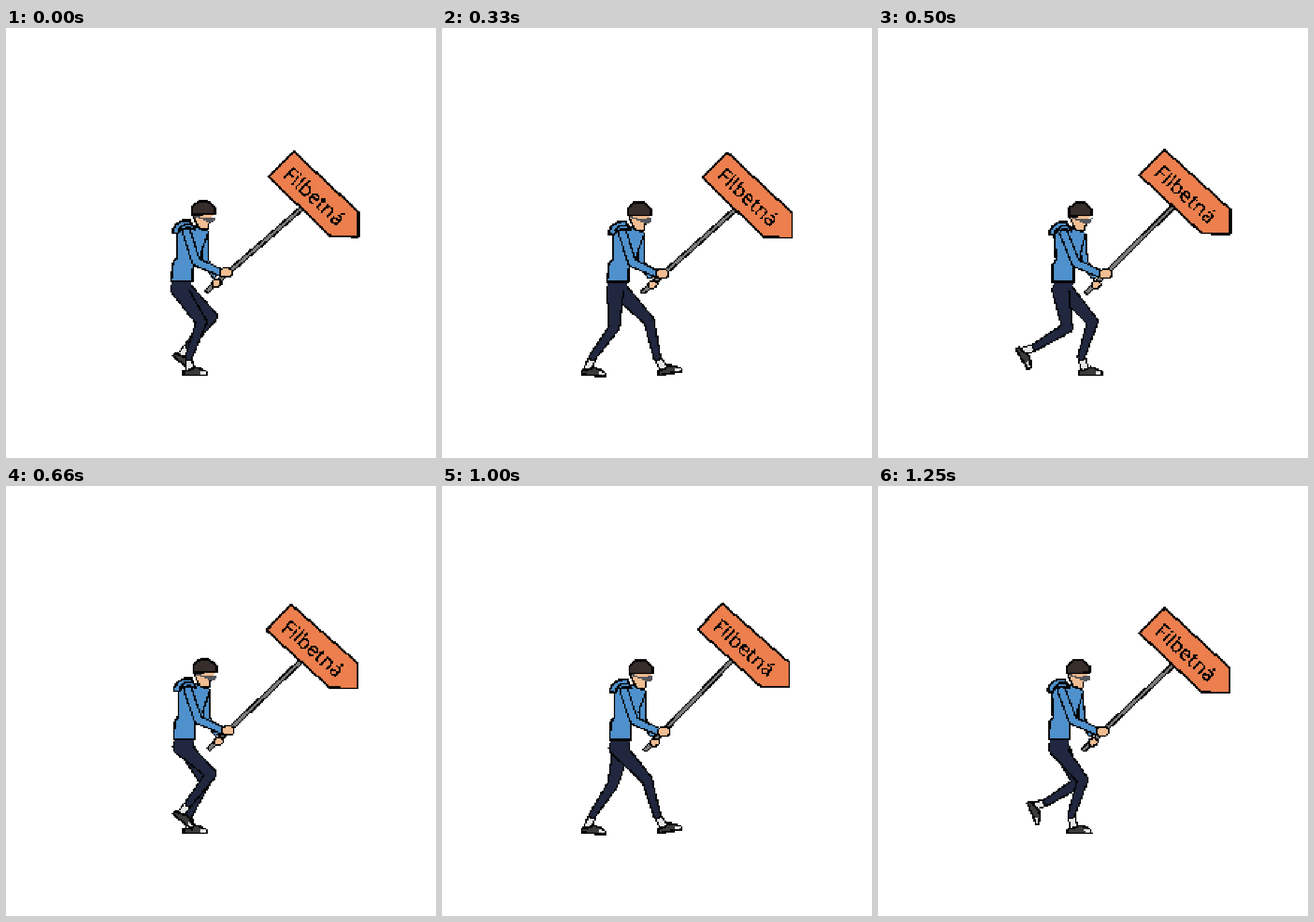
These frames come from a looping animation (748x748 px, 1390 ms). An HTML page with a canvas:

```html
<!DOCTYPE html>
<html lang="cs">
<head>
<meta charset="utf-8">
<title>Walk with a sign</title>
<style>
html, body { margin: 0; width: 100%; height: 100%; overflow: hidden; background: #fff; }
canvas { display: block; width: 100%; height: 100%; image-rendering: pixelated; }
</style>
</head>
<body>
<canvas id="view" width="288" height="288"></canvas>
<script>
const N = 288, CELL = 748 / N, STEPS = 16, LOOP = 1390, TAU = 2 * Math.PI;
const ctx = document.getElementById('view').getContext('2d');
const image = ctx.createImageData(N, N);
const cells = new Uint32Array(image.data.buffer);
const ink = document.createElement('canvas');
ink.width = ink.height = N;
const inkCtx = ink.getContext('2d', { willReadFrequently: true });

const rgb = n => (0xff000000 | (n & 255) << 16 | (n & 0xff00) | n >> 16) >>> 0;
const WHITE = rgb(0xffffff), BLACK = rgb(0x050505), ORANGE = rgb(0xec7f4d),
  BLUE = rgb(0x4f91cc), NAVY = rgb(0x20273f), SKIN = rgb(0xf1bd92),
  HAIR = rgb(0x372d2a), GREY = rgb(0x7b7c7c), LENS = rgb(0x55565c),
  SOCK = rgb(0xe6e6e6), SHOE = rgb(0x3b3b3b);

const mix = (a, b, k) => a + (b - a) * k;
const clamp = v => Math.max(0, Math.min(1, v));
const bell = (x, mid, width) => Math.exp(-(((x - mid) / width) ** 2));
// Cosine that peaks at a step and repeats a number of times per loop
const wave = (step, peak, times = 1) => Math.cos(TAU * times * (step - peak) / STEPS);

// Turns a flat list into points, each passed through a mapping
function points(list, map) {
  const out = [];
  for (let i = 0; i < list.length; i += 2) out.push(map([list[i], list[i + 1]]));
  return out;
}

function paint(pts, pad, color, inside) {
  const xs = pts.map(p => p[0]), ys = pts.map(p => p[1]);
  const cell = v => Math.max(0, Math.min(N - 1, Math.floor(v / CELL)));
  const x0 = cell(Math.min(...xs) - pad), x1 = cell(Math.max(...xs) + pad);
  const y0 = cell(Math.min(...ys) - pad), y1 = cell(Math.max(...ys) + pad);
  for (let j = y0; j <= y1; j++)
    for (let i = x0; i <= x1; i++)
      if (inside((i + .5) * CELL, (j + .5) * CELL)) cells[j * N + i] = color;
}

function fill(pts, color) {
  paint(pts, 0, color, (x, y) => {
    let hit = false;
    pts.forEach(([ax, ay], i) => {
      const [bx, by] = pts[(i + 1) % pts.length];
      if (ay > y !== by > y && x < ax + (bx - ax) * (y - ay) / (by - ay)) hit = !hit;
    });
    return hit;
  });
}

// Round-ended bar whose radius changes from r to s
function bar(p, q, r, s, color) {
  const dx = q[0] - p[0], dy = q[1] - p[1], len = dx * dx + dy * dy || 1;
  paint([p, q], Math.max(r, s), color, (x, y) => {
    const k = clamp(((x - p[0]) * dx + (y - p[1]) * dy) / len);
    return Math.hypot(x - p[0] - dx * k, y - p[1] - dy * k) <= mix(r, s, k);
  });
}

function stroke(pts, r = 1.9, color = BLACK) {
  for (let i = 1; i < pts.length; i++) bar(pts[i - 1], pts[i], r, r, color);
}

function shape(pts, color) {
  fill(pts, color);
  stroke([...pts, pts[0]]);
}

// Outlined chain of bars with one radius per joint
function limb(joints, radii, color, edge = 2.9) {
  for (const [pad, tone] of [[edge, BLACK], [0, color]])
    for (let i = 1; i < joints.length; i++)
      bar(joints[i - 1], joints[i], radii[i - 1] + pad, radii[i] + pad, tone);
}

// Knee of a leg with known lengths, bent forward
function bend(hip, ankle, thigh, shin) {
  const dx = ankle[0] - hip[0], dy = ankle[1] - hip[1], d = Math.hypot(dx, dy);
  const along = (thigh ** 2 - shin ** 2 + d * d) / (2 * d);
  const out = Math.sqrt(Math.max(0, thigh ** 2 - along ** 2));
  return [hip[0] + (dx * along + dy * out) / d, hip[1] + (dy * along - dx * out) / d];
}

// The foot slides back for half the loop, then lifts and swings forward
function drawLeg(hip, step) {
  const back = wave(step, 4);
  const lift = Math.sin(Math.PI * clamp((step - 4) / 8) ** .75) ** 2;
  const ankle = [318 - 56 * back + 4 * wave(step, 2, 2), 572 - 22 * lift];
  const pitch = (70 * bell(step, 6.7, 1.7) - 14 * bell(step, 11, 1.5)) * Math.PI / 180;
  const c = Math.cos(pitch), s = Math.sin(pitch), heel = 9 + 7 * back;
  const foot = ([along, up]) => {
    const x = along - heel, y = 32 - up;
    return [ankle[0] + x * c - y * s, ankle[1] + x * s + y * c];
  };
  limb([ankle, foot([10, 11])], [4.5, 5], SOCK);
  shape(points([0, 0, 0, 7, 10, 9, 20, 14, 31, 11, 40, 5, 41, 0], foot), SHOE);
  bar(foot([31, 5]), foot([37, 4]), 2.6, 1.8, SOCK);
  limb([hip, bend(hip, ankle, 70 - 5 * back, 64), ankle], [13, 7.5, 4.5], NAVY);
}

function drawSign(place) {
  shape(points([0, 0, 154, 0, 183, 32, 146, 64, -3, 62], place), ORANGE);
  const [ox, oy] = place([14, 45]), [ux, uy] = place([15, 45]);
  const c = (ux - ox) / CELL, s = (uy - oy) / CELL;
  inkCtx.setTransform(1, 0, 0, 1, 0, 0);
  inkCtx.clearRect(0, 0, N, N);
  inkCtx.setTransform(c, s, -s, c, ox / CELL, oy / CELL);
  inkCtx.font = '35px "Open Sans", "Noto Sans", sans-serif';
  inkCtx.fillText('Filbetná', 0, 0);
  const data = inkCtx.getImageData(0, 0, N, N).data;
  for (let i = 0; i < cells.length; i++) if (data[i * 4 + 3] > 90) cells[i] = BLACK;
}

function draw(step) {
  // The body rocks twice per loop, with a slower lean on top
  const lean = wave(step, 2);
  const sway = 2.5 + 8 * wave(step, 6, 2) + 3.2 * wave(step, 6, 4) - 3 * lean;
  const bob = 1.5 + 1.8 * wave(step, 5.3, 2);
  const shift = k => ([x, y]) => [x + k * sway, y + bob];
  const head = shift(.5), hand = shift(.8);
  const torso = p => shift(mix(.5, 1, clamp((p[1] - 345) / 95)))(p);

  const corner = [495.5 + 5 * wave(step, 2.8) + 3.5 * wave(step, 7.4, 2), 210.7 + 7.3 * wave(step, 2.4)];
  const angle = (42.3 + 1.2 * lean) * Math.PI / 180, c = Math.cos(angle), s = Math.sin(angle);
  const sign = ([u, v]) => [corner[0] + u * c - v * s, corner[1] + u * s + v * c];

  cells.fill(WHITE);

  drawLeg(torso([311, 453]), (step + STEPS / 2) % STEPS);
  drawLeg(torso([304, 453]), step);
  fill(points([291, 440, 326, 440, 322, 454, 294, 454], torso), NAVY);

  limb([torso([347, 358]), torso([348, 403]), hand([364, 429])], [5, 4, 3], BLUE);
  shape(points([299, 356, 308, 340, 340, 346, 343, 400, 328, 408, 327, 439,
    290, 439, 293, 408, 299, 400], torso), BLUE);
  fill(points([336, 350, 353, 354, 346, 372, 338, 396], torso), BLUE);
  stroke(points([353, 357, 341, 392], torso), 1.5);

  limb([hand([353, 456]), sign([78, 58])], [2.3, 2.3], GREY, 2.6);
  limb([hand([367, 444]), hand([370, 443])], [5, 5], SKIN);
  limb([torso([316, 355]), torso([333, 406]), hand([374, 424])], [5.5, 5.5, 4.5], BLUE);
  limb([hand([382, 425]), hand([388, 425])], [6.5, 6.5], SKIN);

  shape(points([292, 356, 292, 350, 298, 341, 308, 335, 321, 334, 330, 350,
    318, 347, 306, 350, 300, 357], head), BLUE);
  stroke(points([302, 350, 312, 341, 321, 341], head));

  fill(points([328, 323, 364, 323, 356, 334, 355, 346, 350, 349, 337, 349, 329, 337], head), SKIN);
  stroke(points([326, 325, 337, 348, 352, 350, 355, 338], head), 1.5);
  shape(points([325, 324, 325, 311, 337, 301, 352, 301, 365, 312, 365, 323], head), HAIR);
  stroke(points([331, 327, 345, 332], head), 1.6, LENS);
  fill(points([343, 330, 366, 328, 365, 335, 359, 338, 349, 336], head), LENS);

  drawSign(sign);
  ctx.putImageData(image, 0, 0);
}

let shown = -1;
function tick() {
  const t = performance.now() % LOOP;
  let step = STEPS - 1;
  while (Math.floor(step * 25 / 3) * 10 > t) step--;
  if (step !== shown) draw(shown = step);
  requestAnimationFrame(tick);
}
tick();
</script>
</body>
</html>
```
